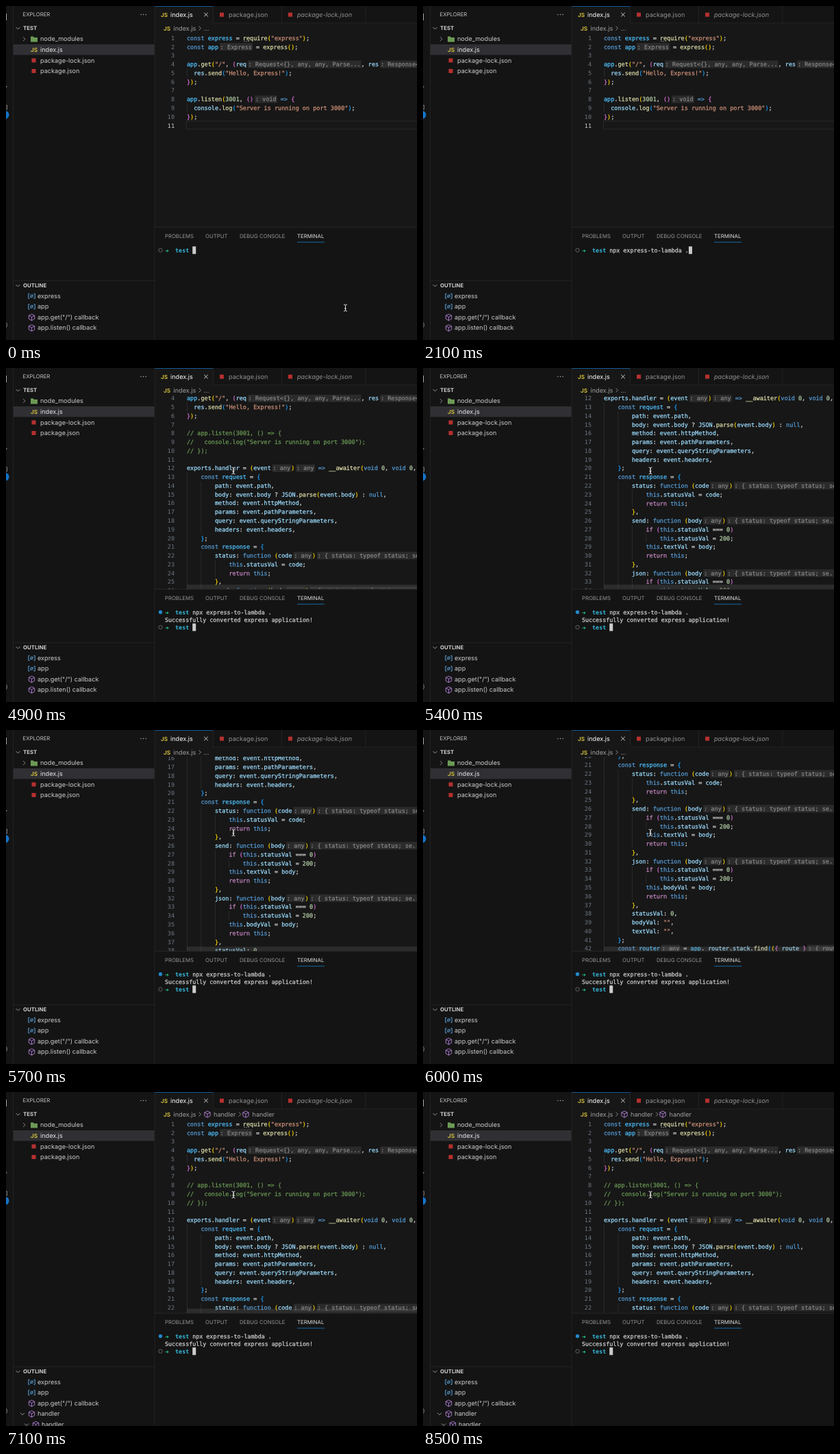
Animation, 600 px wide and 488 px high, one loop 8.6 s. Source, as an HTML page with a canvas:

```html
<!DOCTYPE html>
<html lang="en">
<head>
<meta charset="utf-8">
<title>Editor session</title>
<style>
html, body { margin: 0; width: 100%; height: 100%; overflow: hidden; background: #141414; }
canvas { display: block; }
</style>
</head>
<body>
<canvas width="600" height="488"></canvas>
<script>
const ctx = document.querySelector('canvas').getContext('2d');
const LOOP = 8600, STEP = 100;
const UI = 'Inter, sans-serif', MONO = '"DejaVu Sans Mono", monospace';
const LINE = 12.77, CHAR = 5.117, CODE_X = 264, TERM_CHAR = 5.03;
const SIDE = '#141414', EDITOR = '#171717', BORDER = '#262626', RED = '#b5302f', YELLOW = '#e0cb3e';
const COMMAND = 'npx express-to-lambda .';

// Inlay hints are wrapped in « ».
const HEAD = `const express = require("express");
const app«: Express» = express();

app.get("/", (req«: Request<{}, any, any, Parse...», res«: Response<any, Rec...») => {
  res.send("Hello, Express!");
});
`;
const BEFORE = (HEAD + `
app.listen(3001, ()«: void» => {
  console.log("Server is running on port 3000");
});
`).split('\n');
const RESULT = '«: any»)«: { status: typeof status; se...» {';
const AFTER = (HEAD + `
// app.listen(3001, () => {
//   console.log("Server is running on port 3000");
// });

exports.handler = (event«: any»)«: any» => __awaiter(void 0, void 0, void 0, function* () {
    const request = {
        path: event.path,
        body: event.body ? JSON.parse(event.body) : null,
        method: event.httpMethod,
        params: event.pathParameters,
        query: event.queryStringParameters,
        headers: event.headers,
    };
    const response = {
        status: function (code${RESULT}
            this.statusVal = code;
            return this;
        },
        send: function (body${RESULT}
            if (this.statusVal === 0)
                this.statusVal = 200;
            this.textVal = body;
            return this;
        },
        json: function (body${RESULT}
            if (this.statusVal === 0)
                this.statusVal = 200;
            this.bodyVal = body;
            return this;
        },
        statusVal: 0,
        bodyVal: "",
        textVal: "",
    };
    const router«: any» = app._router.stack.find(({ route }«: { route: any; }») => route);
    yield router.handle(request, response, ()«: void» => { });
    return {
        statusCode: response.statusVal,
        body: response.bodyVal,
    };
});`).split('\n');

const TOKEN = /«.*?»|"[^"]*"|\/\/.*|\s+|=>|\w+|./g;
const BRACKETS = ['#ffd700', '#da70d6', '#179fff'];
const KEYWORD = /^(const|function|this|void|null|=>)$/;
const CONTROL = /^(return|yield|if)$/;
const CONSTANT = /^(express|app|request|response|router)$/;

// Time and scroll offset pairs, linear in between.
const SCROLL = [[4700, 0], [5400, 143], [6000, 251], [6400, 320], [6700, 297], [7100, 0]];
const POINTER = [[4300, 495.5, 441], [4600, 332, 150]];

function along(keys, t, i = 1) {
  if (t <= keys[0][0]) return keys[0][i];
  for (let k = 1; k < keys.length; k++) {
    const a = keys[k - 1], b = keys[k];
    if (t <= b[0]) return a[i] + (b[i] - a[i]) * (t - a[0]) / (b[0] - a[0]);
  }
  return keys[keys.length - 1][i];
}

function box(x, y, w, h, color) {
  ctx.fillStyle = color;
  ctx.fillRect(x, y, w, h);
}

function text(s, x, y, color, font, align = 'left') {
  ctx.font = font;
  ctx.fillStyle = color;
  ctx.textAlign = align;
  ctx.fillText(s, x, y);
}

const label = (s, x, y, color = '#cccccc', size = 9.1, style = '') =>
  text(s, x, y + size * 0.35, color, `${style} ${size}px ${UI}`);

// A hairline outline gives the code its slightly heavier weight.
function code(s, x, y, color, size = 8.5, style = '') {
  text(s, x, y + 3, color, `${style} ${size}px ${MONO}`);
  ctx.strokeStyle = color;
  ctx.lineWidth = 0.25;
  ctx.strokeText(s, x, y + 3);
}

function stroke(path, color, width = 0.8) {
  ctx.strokeStyle = color;
  ctx.lineWidth = width;
  ctx.stroke(new Path2D(path));
}

function disc(x, y, r, color, hollow) {
  ctx.beginPath();
  ctx.arc(x, y, r, 0, 7);
  ctx.fillStyle = ctx.strokeStyle = color;
  ctx.lineWidth = 0.8;
  hollow ? ctx.stroke() : ctx.fill();
}

const down = (x, y) => stroke(`M${x - 3} ${y - 1.5}l3 3l3-3`, '#b5b5b5');
const right = (x, y) => stroke(`M${x - 1.5} ${y - 3}l3 3l-3 3`, '#a5a5a5');
const scriptIcon = (x, y) => label('JS', x, y, YELLOW, 8.2, '600');
const packageIcon = (x, y) => box(x + 2, y - 3, 6, 6, RED);
const cube = (x, y) =>
  stroke(`M${x} ${y - 4.6}l4.2 2v5l-4.2 2.4l-4.2-2.4v-5zM${x - 4.2} ${y - 2.6}l4.2 2.2l4.2-2.2M${x} ${y - 0.4}v5.2`, '#b180d7', 0.9);

function variableIcon(x, y) {
  stroke(`M${x - 3} ${y - 3.5}h-1.7v7h1.7M${x + 3} ${y - 3.5}h1.7v7h-1.7M${x - 2} ${y + 2}l4-4`, '#62b2ee', 0.9);
  disc(x, y, 1.9, '#62b2ee', true);
}

function wordColor(word, previous, next) {
  if (KEYWORD.test(word)) return '#569cd6';
  if (CONTROL.test(word)) return '#c586c0';
  if (/^\d/.test(word)) return '#b5cea8';
  if (next === '(') return '#dcdcaa';
  if (CONSTANT.test(word) && previous !== '.') return '#4fc1ff';
  return '#9cdcfe';
}

function drawCode(lines, scroll, activeLine) {
  let depth = 0;
  lines.forEach((line, row) => {
    const y = 46.8 + row * LINE - scroll;
    let x = CODE_X;
    if (row + 1 === activeLine) {
      ctx.strokeStyle = '#282828';
      ctx.lineWidth = 1;
      ctx.strokeRect(CODE_X - 0.5, y - 6.3, 340, LINE - 1);
    }
    text(row + 1, 246, y + 3, row + 1 === activeLine ? '#cccccc' : '#6e7681', `8.5px ${MONO}`, 'right');
    const indent = line.search(/\S/);
    for (let c = 0; c < indent; c += 4) box(CODE_X + c * CHAR, y - LINE / 2, 0.8, LINE, '#303030');

    for (const match of line.matchAll(TOKEN)) {
      const s = match[0];
      if (s[0] === '«') {
        const hint = s.slice(1, -1), width = hint.length * CHAR;
        box(x + 1.9, y - 5.5, width + 1.9, 11, '#2b2b2b');
        code(hint, x + 2.8, y, '#868686');
        x += width + 3.8;
        continue;
      }
      let color = '#d4d4d4';
      if (s[0] === '"') color = '#ce9178';
      else if (s.startsWith('//')) color = '#6a9955';
      else if ('([{'.includes(s)) color = BRACKETS[depth++ % 3];
      else if (')]}'.includes(s)) color = BRACKETS[--depth % 3];
      else if (/^(\w+|=>)$/.test(s)) color = wordColor(s, line[match.index - 1], line[match.index + s.length]);
      code(s, x, y, color);
      x += s.length * CHAR;
    }
  });
}

function drawEditor(t) {
  const changed = t >= 3800;
  box(217, 0, 383, 323, EDITOR);
  ctx.save();
  ctx.beginPath();
  ctx.rect(217, 39, 383, 284);
  ctx.clip();
  drawCode(changed ? AFTER : BEFORE, along(SCROLL, t), changed ? 0 : 11);
  if (along(SCROLL, t) < 8) for (let i = 0; i < 3; i++) box(347.5 + i * 3, 51, 1.2, 1.2, '#a0a0a0');
  if (t >= 4500 && t < 7500) box(264, 316.5, 336, 6.5, 'rgba(121,121,121,.22)');
  ctx.restore();

  box(302, 0, 298, 25, SIDE);
  box(302, 24.5, 298, 0.8, BORDER);
  for (const x of [302, 402, 524.5]) box(x, 0, 0.8, 25, BORDER);
  box(217, 0, 85, 0.8, '#1068ae');
  scriptIcon(226, 12.7);
  label('index.js', 240, 12.7, '#ffffff');
  stroke('M289.2 9.8l5.6 5.6M294.8 9.8l-5.6 5.6', '#dedede', 0.9);
  packageIcon(310, 12.7);
  label('package.json', 325, 12.7, '#929292');
  packageIcon(410, 12.7);
  label('package-lock.json', 425, 12.7, '#929292', 9.1, 'italic');

  scriptIcon(230, 32.7);
  label('index.js', 244.5, 32.5, '#a0a0a0');
  right(283, 32.5);
  if (t < 6100) label('...', 288.5, 32.5, '#a0a0a0');
  else {
    cube(294, 32.5);
    label('handler', 303, 32.5, '#a0a0a0');
    right(341.5, 32.5);
    cube(350, 32.5);
    label('handler', 359.5, 32.5, '#a0a0a0');
  }
}

function drawSidebar(t) {
  box(10, 0, 0.8, 488, BORDER);
  box(0, 11, 0.9, 10, '#bbb');
  stroke('M0 119l1.5-2', '#999', 1);
  stroke('M0 145h1.5v6h-1.5', '#999');
  disc(-1.5, 159, 6, '#1473c8');
  disc(-4, 466, 5.5, '#999', true);

  label('EXPLORER', 24.5, 12.7, '#c4c4c4', 7.8);
  for (let i = 0; i < 3; i++) disc(197 + i * 3.6, 12.5, 0.7, '#c0c0c0');
  down(17.5, 32.5);
  label('TEST', 25, 32.5, '#d0d0d0', 7.8, '700');
  right(26.5, 48.2);
  ctx.fillStyle = '#6c9a55';
  ctx.fill(new Path2D('M36 44.5h4l1 1.4h5v6.6h-10z'));
  label('node_modules', 50, 48.2);
  box(10.8, 56, 206, 15.5, '#303034');
  scriptIcon(36, 63.8);
  label('index.js', 50, 63.8, '#e8e8e8');
  packageIcon(35.5, 79.5);
  label('package-lock.json', 50, 79.5);
  packageIcon(35.5, 95);
  label('package.json', 50, 95);

  box(10.8, 401, 206, 0.8, BORDER);
  down(17.5, 408.5);
  label('OUTLINE', 25, 408.5, '#d0d0d0', 7.8, '700');
  variableIcon(37.5, 423.8);
  label('express', 46, 423.8);
  variableIcon(37.5, 439.3);
  label('app', 46, 439.3);
  cube(37.5, 454.8);
  label('app.get("/") callback', 46, 454.8);
  cube(37.5, 470.3);
  if (t < 6100) label('app.listen() callback', 46, 470.3);
  else {
    down(24, 470.3);
    label('handler', 46, 470.3);
    down(30, 486);
    cube(43.5, 486);
    label('handler', 52, 486);
    if (t < 7000) box(210, 416, 7, 18, '#2a2a2a');
  }
  box(216.6, 0, 0.8, 488, BORDER);
}

function typedLength(t) {
  if (t < 500) return 0;
  if (t < 700) return 1;
  if (t < 900) return 3;
  return Math.min(COMMAND.length, 3 + Math.ceil((t - 800) / 60));
}

function drawTerminal(t) {
  const entered = t >= 2400, done = t >= 3400;
  const column = n => 232 + n * TERM_CHAR;
  const term = (s, n, y, color = '#d0d0d0', style) => code(s, column(n), y, color, 8.35, style);
  const cursor = (n, y) => box(column(n), y - 5.5, 5, 11, '#cccccc');
  const prompt = (y, ok) => {
    disc(225.5, y, 2.7, ok ? '#2389cc' : '#777', !ok);
    text('➜', column(0), y + 3, '#23d18b', `bold 7px "DejaVu Sans", sans-serif`);
    text('test', column(3), y + 3, '#35b8db', `bold 8.35px ${MONO}`);
  };

  box(217, 323, 383, 165, SIDE);
  box(217, 322.8, 383, 0.8, '#2c2c2c');
  label('PROBLEMS', 232, 336.3, '#969696', 7.75);
  label('OUTPUT', 291, 336.3, '#969696', 7.75);
  label('DEBUG CONSOLE', 341, 336.3, '#969696', 7.75);
  label('TERMINAL', 425, 336.3, '#e2e2e2', 7.75);
  box(425, 344.6, 40, 0.9, '#1473b8');

  const typed = typedLength(t);
  prompt(356.8, done);
  term(COMMAND.slice(0, typed), 8, 356.8);
  if (!entered) cursor(8 + typed, 356.8);
  else if (!done) cursor(0, 367.8);
  else {
    term('Successfully converted express application!', 0, 367.8);
    prompt(378.8);
    cursor(8, 378.8);
  }
}

function drawPointer(t) {
  if (t >= 500 && t < 4300) return;
  const x = t < 500 ? POINTER[0][1] : along(POINTER, t, 1);
  const y = t < 500 ? POINTER[0][2] : along(POINTER, t, 2);
  const beam = `M${x - 2.5} ${y - 5}q2.5 0 2.5 2v6q0 2-2.5 2M${x + 2.5} ${y - 5}q-2.5 0-2.5 2v6q0 2 2.5 2M${x - 1.5} ${y + 1}h3`;
  stroke(beam, '#111', 2.4);
  stroke(beam, '#ddd', 1);
}

function frame(now) {
  const t = Math.floor(now % LOOP / STEP) * STEP;
  ctx.textRendering = 'geometricPrecision';
  box(0, 0, 600, 488, SIDE);
  drawEditor(t);
  drawTerminal(t);
  drawSidebar(t);
  drawPointer(t);
  requestAnimationFrame(() => frame(performance.now() - start));
}

const start = performance.now();
frame(0);
</script>
</body>
</html>
```
